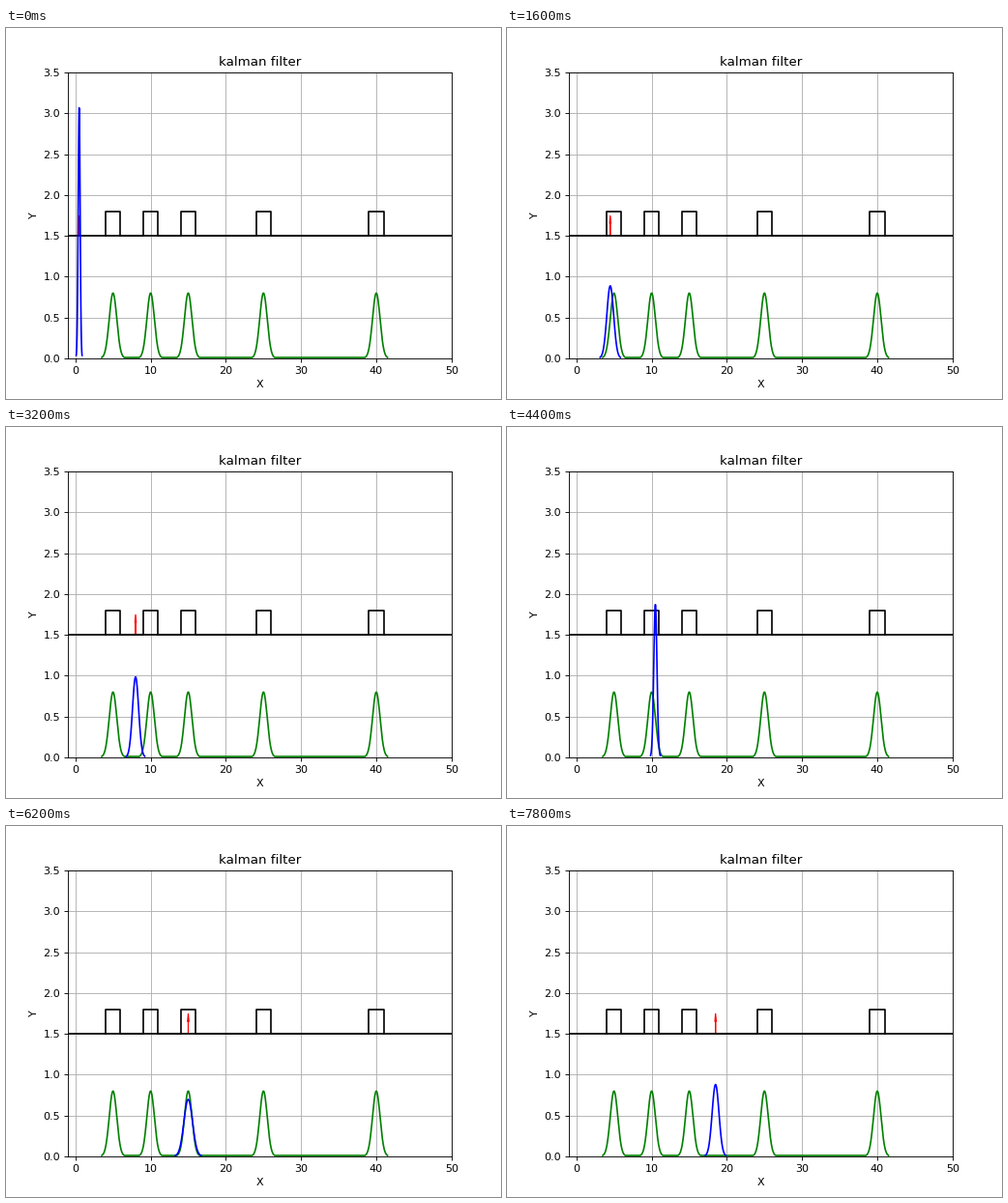
Write a matplotlib script that moves like this. It is 512x384 px and loops after 8000 ms.

```python
import numpy as np
import matplotlib.pyplot as plt
from matplotlib.animation import FuncAnimation

DOORS = [5, 10, 15, 25, 40]
SENSOR_STD = 0.5
MEAS_VAR = SENSOR_STD ** 2
STEP, STEP_NOISE = 0.5, 0.04
FRAMES, INTERVAL = 40, 200
GROUND, DOOR_TOP = 1.5, 1.8


def bell(mean, scale, n=100):
    x = np.linspace(mean - 3 * scale, mean + 3 * scale, n)
    y = np.exp(-0.5 * ((x - mean) / scale) ** 2) / (scale * np.sqrt(2 * np.pi))
    return x, y


def run_filter():
    """Belief (position, spread) per frame: predict, then correct at a door."""
    x, p = 0.5, 0.13
    states = [(x, p)]
    while len(states) < FRAMES:
        x, p = x + STEP, p + STEP_NOISE
        states.append((x, p))
        if x in DOORS:
            p = p * MEAS_VAR / (p + MEAS_VAR)
            states.append((x, p))
    return states[:FRAMES]


plt.rcParams["font.family"] = "DejaVu Sans"
fig, ax = plt.subplots(figsize=(6.4, 4.8), dpi=80)
ax.set(xlim=(-1, 50), ylim=(0, 3.5), xlabel="X", ylabel="Y",
       title="kalman filter")
ax.grid(True)

# Ground with doors
ax.plot([-1, 50], [GROUND, GROUND], color="black")
door_x = np.ravel([[d - 1, d - 1, d + 1, d + 1] for d in DOORS])
door_y = [GROUND, DOOR_TOP, DOOR_TOP, GROUND] * len(DOORS)
ax.plot(door_x, door_y, color="black")

# Sensor likelihood around each door
ax.plot(*np.hstack([bell(d, SENSOR_STD) for d in DOORS]), color="green")

belief, = ax.plot([], [], color="blue")
states = run_filter()
arrows = [ax.arrow(x, GROUND, 0, 0.15, head_width=0.2, head_length=0.1,
                   color="red", visible=False)
          for x, _ in states]


def update(i):
    belief.set_data(*bell(*states[i]))
    for k, arrow in enumerate(arrows):
        arrow.set_visible(k == i)
    return [belief, *arrows]


anim = FuncAnimation(fig, update, frames=FRAMES, interval=INTERVAL,
                     repeat=True, repeat_delay=0)
plt.show()
```
